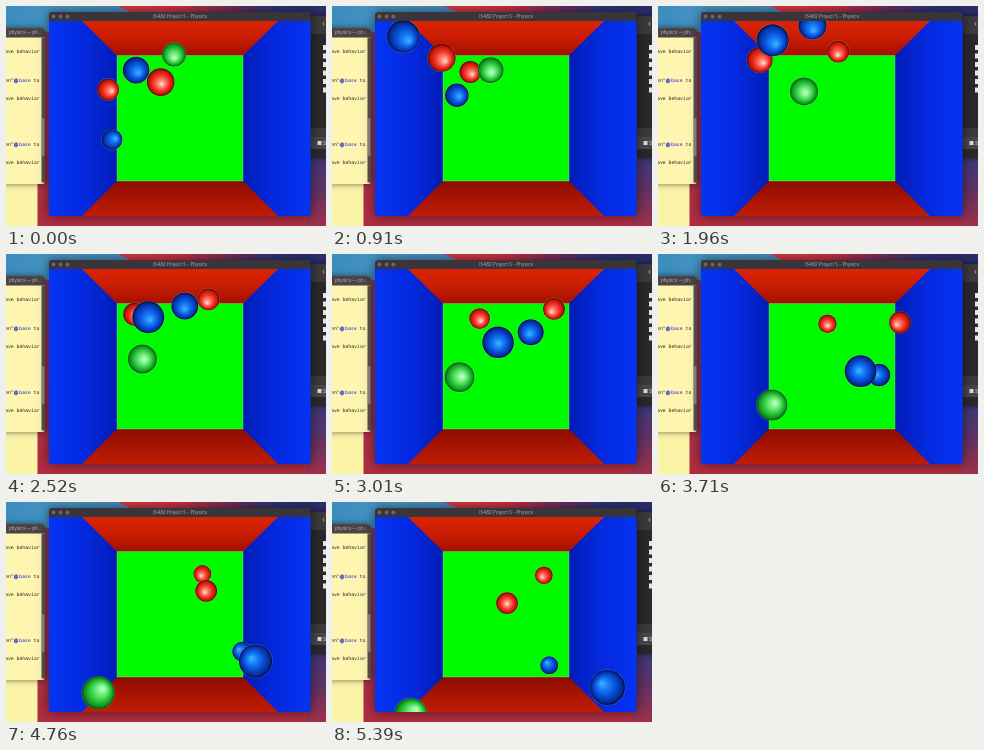
Write an HTML page with a canvas that moves like this. It is 320x220 px and loops after 5.46 s.

```html
<!DOCTYPE html>
<html lang="en">
<head>
<meta charset="utf-8">
<style>
  html, body { margin: 0; width: 100%; height: 100%; overflow: hidden; background: #345; }
  canvas { display: block; width: 320px; height: 220px; }
</style>
</head>
<body>
<canvas id="stage"></canvas>
<script>
const canvas = document.getElementById('stage');
const ratio = window.devicePixelRatio || 1;
canvas.width = 320 * ratio;
canvas.height = 220 * ratio;
const ctx = canvas.getContext('2d');
ctx.scale(ratio, ratio);

const LOOP = 5460, STEP = 70;
const CX = 174, CY = 112;   // vanishing point
const WALL = 6.6;           // reach of a ball's centre, in ball radii
const MONO = '"DejaVu Sans Mono", monospace';
const SANS = 'Inter, sans-serif';

// Shades run from the highlight to the rim.
const SHADES = {
  red: ['#ffe4dc', '#ff7868', '#f03020', '#b81408', '#480400'],
  blue: ['#48b4ff', '#1680f8', '#0850d8', '#062c98', '#000c3c'],
  green: ['#c8ffd0', '#78f084', '#30cc40', '#109020', '#045010']
};

// Straight legs between [time, x, y, apparent radius]. Positions are in ball
// radii and may pass the walls: fold() turns that into bounces.
const balls = [
  { color: 'green', path: [[0, -.5, -5.3, 12], [1960, -2, -1.9, 14],
    [4200, -4.4, 3.75, 16], [5390, -5.6, 5.95, 17]] },
  { color: 'blue', path: [[0, -3.3, -3.6, 13.3], [910, -6.3, -5, 16.3],
    [3010, -12.7, -11.7, 15.8], [4200, -16.6, -14.8, 16], [5390, -19, -17.4, 17.5]] },
  { color: 'blue', path: [[0, -6.6, 2.1, 10.3], [1960, -1.4, -6.6, 14],
    [3010, 1.9, -10.6, 13], [3710, 4.2, -14, 11.2], [5390, 8.4, -18.9, 9]] },
  { color: 'red', path: [[0, -1.4, -2.6, 13.8], [910, -4.6, -4.3, 14],
    [1960, -7.6, -4.5, 12.9], [3710, -12.7, -4.6, 9.2], [5390, -17.5, -4.4, 8.8]] },
  { color: 'red', path: [[0, -6.6, -2.6, 10.9], [5390, 13.1, -12.2, 10.9]] }
];

function linear(x0, y0, x1, y1, colors) {
  const g = ctx.createLinearGradient(x0, y0, x1, y1);
  colors.forEach((c, i) => g.addColorStop(i / (colors.length - 1), c));
  return g;
}

function rect(x, y, w, h, fill, radius = 0) {
  ctx.fillStyle = fill;
  ctx.beginPath();
  ctx.roundRect(x, y, w, h, radius);
  ctx.fill();
}

function polygon(points, fill) {
  ctx.fillStyle = fill;
  ctx.beginPath();
  points.forEach(([x, y]) => ctx.lineTo(x, y));
  ctx.fill();
}

function disc(x, y, r, fill) {
  ctx.fillStyle = fill;
  ctx.beginPath();
  ctx.arc(x, y, r, 0, 2 * Math.PI);
  ctx.fill();
}

function text(s, x, y, size, fill, family, align = 'left') {
  ctx.font = size + 'px ' + family;
  ctx.fillStyle = fill;
  ctx.textAlign = align;
  ctx.textBaseline = 'middle';
  ctx.fillText(s, x, y);
}

function shadow(blur) {
  ctx.shadowColor = 'rgba(0,0,0,.55)';
  ctx.shadowBlur = blur * ratio;
}

function desktop() {
  rect(0, 0, 320, 220, linear(0, 20, 0, 220, ['#8a4468', '#a83450', '#b02c40']));
  rect(0, 0, 320, 26, linear(120, 0, 320, 0, ['#d83a44', '#d03040', '#7a2c58', '#2c3478', '#2a2c68']));
  polygon([[0, 0], [112, 0], [140, 14], [60, 26], [0, 26]],
    linear(0, 0, 125, 0, ['#3c8cbc', '#4896c4', '#4a88bc']));
  rect(300, 26, 20, 194, linear(0, 140, 0, 220, ['#353a80', '#5a3268', '#a03048']));
}

function editor() {
  rect(0, 176, 31.5, 44, '#fbf3a6');
  shadow(6);
  rect(-6, 22, 45, 156, '#fdf5b0', 3);
  shadow(0);
  rect(-6, 22, 45, 9.5, '#4a4446', [0, 3, 0, 0]);
  text('physics — ph…', 3, 27, 4.5, '#b9b2ae', SANS);
  rect(35.5, 31.5, 3.5, 145, '#56524e');
  rect(36, 112, 2.5, 38, '#8b8782', 1);
  for (const y of [46, 93, 157]) text('ave behavior', -1, y, 4.8, '#2c2820', MONO);
  for (const y of [75, 139]) {
    text('en"', -1, y, 4.8, '#2c2820', MONO);
    disc(10, y, 2.4, '#8c8ce0');
    text('@', 10, y, 4.8, '#2020a8', MONO, 'center');
    text('base', 13, y, 4.8, '#3a30c0', MONO);
    text('to', 27.5, y, 4.8, '#2c2820', MONO);
  }
}

function sidePanel() {
  shadow(6);
  rect(302, 10, 24, 142, '#29282b', 3);
  shadow(0);
  rect(305, 10, 15, 18, '#3b393d');
  text('‹', 316, 18, 8, '#bbb', SANS);
  for (let y = 39; y < 82; y += 8.5) rect(317, y, 3, 5, '#e4e4e6');
  rect(305, 122, 15, 9, '#3a393c');
  rect(305, 131, 15, 12, '#48464a');
  rect(311.5, 135, 4, 4, '#ddd', .5);
  text('S', 317, 137.3, 5, '#ddd', SANS);
}

function room() {
  shadow(12);
  rect(43, 6, 261.5, 204, '#39353a', 3);
  shadow(0);
  for (const x of [47.5, 54.5, 61.5]) disc(x, 10.5, 1.9, '#6a666a');
  text('IS482 Project 5 - Physics', CX, 10.8, 4.5, '#b4b0b4', SANS, 'center');

  const side = ['#0434f4', '#042ae0', '#021cb8'];
  rect(43, 15, 68.5, 195, linear(43, 0, 111, 0, side), [0, 0, 0, 3]);
  rect(236.5, 15, 68, 195, linear(305, 0, 237, 0, side), [0, 0, 3, 0]);
  polygon([[76, 15], [272, 15], [237, 49.5], [111, 49.5]],
    linear(0, 15, 0, 49, ['#dc2404', '#c81c02', '#a41000']));
  polygon([[111, 175], [237, 175], [272, 210], [76, 210]],
    linear(0, 175, 0, 210, ['#8c0c00', '#a81402', '#c01c04']));
  rect(111, 49.5, 126, 125.5, '#00fb00');
  ctx.strokeStyle = 'rgba(235,255,225,.35)';
  ctx.lineWidth = .7;
  ctx.strokeRect(111, 49.5, 126, 125.5);
}

function fold(v) {
  const span = 4 * WALL;
  const m = ((v + WALL) % span + span) % span;
  return m < 2 * WALL ? m - WALL : 3 * WALL - m;
}

// Depth is proportional to 1 / radius, so that is what moves evenly.
function place(path, t) {
  const next = path.findIndex(p => p[0] > t);
  const i = next < 0 ? path.length - 1 : next;
  const [t0, x0, y0, r0] = path[i - 1], [t1, x1, y1, r1] = path[i];
  const k = (t - t0) / (t1 - t0);
  const mix = (a, b) => a + (b - a) * k;
  const r = 1 / mix(1 / r0, 1 / r1);
  return { x: CX + r * fold(mix(x0, x1)), y: CY + r * fold(mix(y0, y1)), r };
}

// The light sits at the viewer, so highlights lean towards the middle.
function drawBall({ x, y, r, color }) {
  const lean = .06;
  const g = ctx.createRadialGradient(x + (CX - x) * lean, y + (CY - y) * lean, 0, x, y, r);
  const stops = [0, .3, .6, .87, 1];
  SHADES[color].forEach((c, i) => g.addColorStop(stops[i], c));
  disc(x, y, r + .4, 'rgba(235,255,235,.3)');
  disc(x, y, r, g);
}

function frame(now) {
  const t = Math.floor(now % LOOP / STEP) * STEP;
  desktop();
  editor();
  sidePanel();
  room();
  ctx.save();
  ctx.beginPath();
  ctx.roundRect(43, 15, 261.5, 195, [0, 0, 3, 3]);
  ctx.clip();
  balls.map(b => ({ ...place(b.path, t), color: b.color }))
    .sort((a, b) => a.r - b.r)
    .forEach(drawBall);
  ctx.restore();
}

const start = performance.now();
function tick() {
  frame(performance.now() - start);
  requestAnimationFrame(tick);
}
tick();
</script>
</body>
</html>
```
